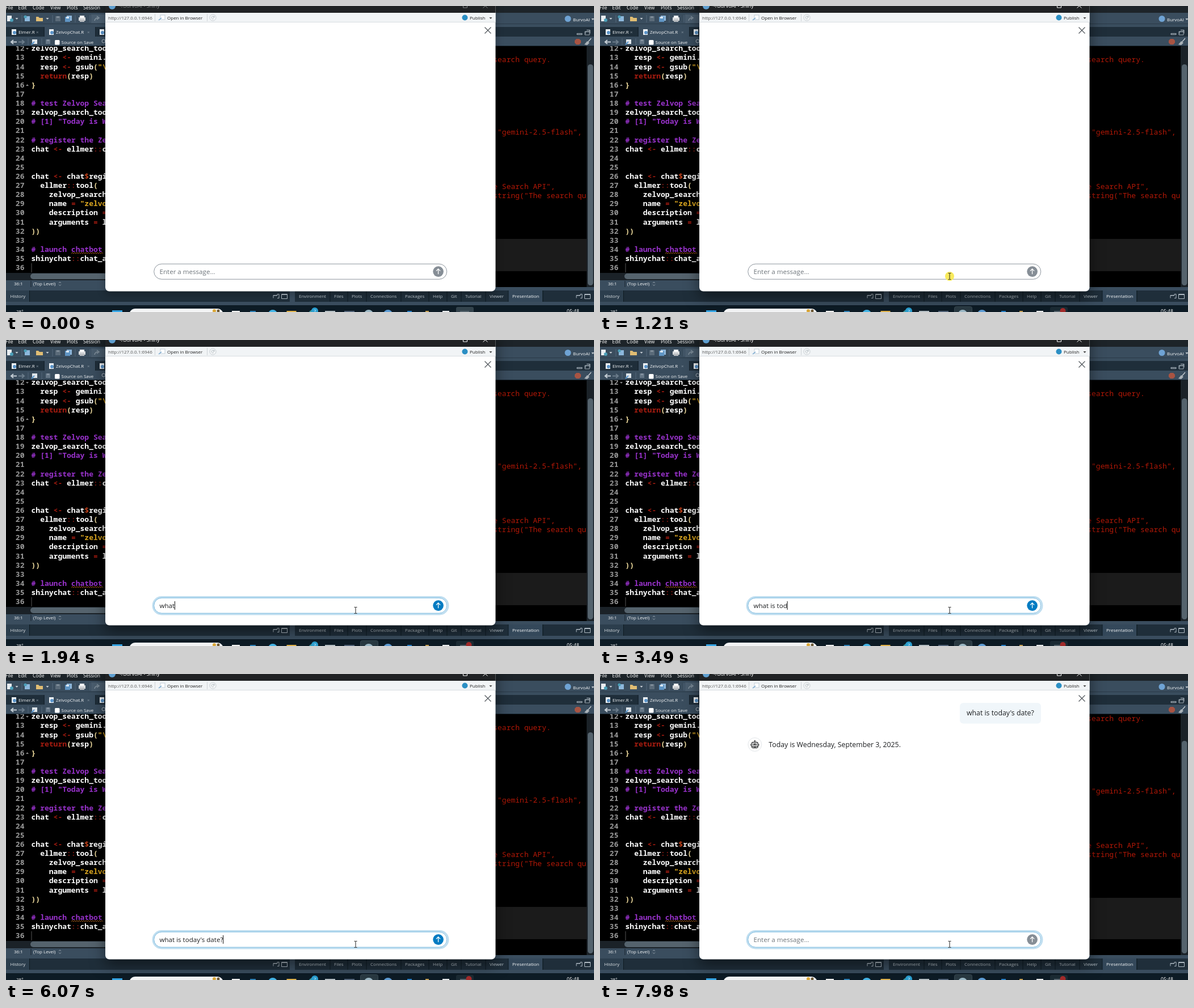
An HTML page for the animation above (8 s loop, 1036x540 px).

```html
<!DOCTYPE html>
<html lang="en">
<head>
<meta charset="utf-8">
<title>Chat window</title>
<style>
html, body { margin: 0; width: 100%; height: 100%; overflow: hidden; background: #000; }
svg { display: block; width: 100vw; height: 100vh; }
text { font-family: "Open Sans", "Noto Sans", sans-serif; font-size: 8px; white-space: pre; }
.code text { font: 600 13.04px "Noto Sans Mono", "DejaVu Sans Mono", monospace; }
.console text { font: 500 13.04px "Noto Sans Mono", "DejaVu Sans Mono", monospace; }
.input text { font-size: 11.58px; }
.chat text { font-size: 12.3px; }
</style>
</head>
<body>
<svg id="stage" viewBox="0 0 1036 540"></svg>
<script>
const LOOP = 8000;
const MESSAGE = "what is today's date?";
const KEYS = [1540, 1670, 1810, 1940, 2200, 2570, 2620, 2820, 3020, 3220, 3490,
  3760, 3910, 4520, 4620, 4770, 4910, 5090, 5210, 5410, 6070];
const FOCUS = 1280, SENT = 6370, ROBOT = 6720, REPLY = 6980, REPLY_END = 7260;
const BLINK = 510;

const esc = s => s.replace(/&/g, "&amp;").replace(/</g, "&lt;");
const text = (x, y, s, fill = "#f2f4f5", more = "") =>
  `<text x="${x}" y="${y}" fill="${fill}" ${more}>${esc(s)}</text>`;
const rect = (x, y, w, h, fill, more = "") =>
  `<rect x="${x}" y="${y}" width="${w}" height="${h}" fill="${fill}" ${more}/>`;
const dot = (x, y, r, fill, more = "") => `<circle cx="${x}" cy="${y}" r="${r}" fill="${fill}" ${more}/>`;
const line = (d, stroke, width = 1, more = "") =>
  `<path d="${d}" fill="none" stroke="${stroke}" stroke-width="${width}" ${more}/>`;
const group = (id, body, more = "") => `<g id="${id}" ${more}>${body}</g>`;
const drop = (x, y, fill = "#c5ccd2") => `<path d="M${x - 2.5} ${y - 1}h5l-2.5 3z" fill="${fill}"/>`;

// Code editor
const CODE = `zelvop_search_tool
  resp <- gemini.
  resp <- gsub("\\
  return(resp)
}

# test Zelvop Sea
zelvop_search_tool
# [1] "Today is W

# register the Ze
chat <- ellmer::c


chat <- chat$regi
  ellmer::tool(
    zelvop_search
    name = "zelvo
    description =
    arguments = l
))

# launch chatbot
shinychat::chat_a
`.split("\n");

function highlight(row) {
  if (row[0] === "#") return `<tspan fill="#9932cc">${esc(row)}</tspan>`;
  return row.split(/("[^"]*|<-|::|=|\$|return|[(){}])/).map(part => {
    const fill = part[0] === '"' ? "#d9a520"
      : part === "$" ? "#c8441c"
      : part === "::" ? "#6e1610"
      : /^(<-|=|return)$/.test(part) ? "#a81c10"
      : /^[(){}]$/.test(part) ? "#f3dfa0" : "#ffffff";
    return `<tspan fill="${fill}">${esc(part)}</tspan>`;
  }).join("");
}

function editor() {
  const rows = CODE.map((row, i) => {
    const y = 79.3 + i * 16.12;
    return text(32.5, y, String(12 + i), "#9a9a9a", 'text-anchor="end"') +
      `<text x="44.5" y="${y}">${highlight(row)}</text>`;
  }).join("");
  let wave = "M115 437";
  for (let x = 115; x < 168; x += 4) wave += "l2 -2l2 2";
  return rect(0, 71, 176, 413, "#000") + group("code", rows, 'class="code"') +
    drop(37.5, 75, "#8a8a8a") + '<path d="M35 141h5l-2.5 -3z" fill="#8a8a8a"/>' +
    line(wave, "#b8651b", 0.9) + rect(44.5, 454, 1, 16, "#555") +
    rect(0, 471, 176, 13, "#1b2228") + rect(43, 472, 160, 10, "#55636d", 'rx="5"');
}

// Dark application window around the chat
const windowIcons = (x, y) =>
  line(`M${x - 5} ${y + 3.5}v-5h7v-2h3v7h-3M${x - 5} ${y - 1}h7`, "#aeb9c2") +
  line(`M${x + 9.5} ${y - 3.5}h10v8h-10zM${x + 9.5} ${y - 2.5}h10`, "#aeb9c2");

function chrome() {
  const menu = [[-1, "File"], [21.5, "Edit"], [47, "Code"], [78, "View"], [107, "Plots"], [136, "Session"]];
  const tabs = [[516, "Environment"], [578, "Files"], [609, "Plots"], [642, "Connections"], [703, "Packages"],
    [752, "Help"], [784, "Git"], [809, "Tutorial"], [852, "Viewer"], [892, "Presentation"]];
  const bar = "#3a4d5e", edge = "#16222c", tab = "#1f2e3a";
  const page = (x, y) => rect(x - 4, y - 5, 8, 10, "#eef2f5") + dot(x + 1, y + 1, 3, "#5b94c9");
  return rect(0, 0, 1036, 12, "#1d2429") + menu.map(([x, s]) => text(x, 6, s, "#fff", 'style="font-size:8.5px"')).join("") +
    rect(0, 12, 1036, 25, bar) + rect(0, 31, 1036, 1, "#2a3a48") +
    // toolbar icons
    rect(2, 17, 8, 10, "#e9eef2") + dot(10, 25, 3, "#4c9fb8") + drop(19, 22) +
    rect(33, 18, 9, 9, "#8db8dc") + dot(34, 19, 2.6, "#4c9fb8") +
    '<path d="M53 19h4l2 2h6v6h-12z" fill="#e0bd73"/>' + drop(73, 22) +
    rect(87, 18, 9, 9, "#5b6b79") + rect(89, 18, 5, 3, "#7f8d99") +
    rect(107, 17, 9, 9, "#8fb7da") + rect(104, 19, 9, 9, "#5f95c4") + rect(106, 19, 5, 3, "#dce8f2") +
    rect(128, 20, 12, 6, "#d7d9db") + rect(130, 17, 8, 4, "#fff") + rect(130, 24, 8, 4, "#b9bdc1") +
    rect(150, 15, 26, 15, "#4a5d6e") + line("M156 26q1 -5 6 -5M160 18l4 3l-4 3", "#83929e", 1.5) +
    [27.5, 81.5, 121.5, 147.5].map(x => rect(x, 16, 1, 13, "#54687b")).join("") +
    dot(990, 22.5, 5.5, "#6fa3d4") + text(999, 26.5, "BurvoAI") + drop(1034, 23) +
    // editor tabs
    rect(0, 37, 1036, 17, tab) + rect(68, 37, 89, 17, bar) + rect(66.5, 37, 1, 17, edge) + rect(157, 37, 1, 17, edge) +
    page(14, 46) + text(22, 49, "Elmer.R") + text(53, 49, "×", "#87949f") +
    page(80, 46) + text(88, 49, "ZelvopChat.R") + text(143, 49, "×", "#87949f") + page(169, 46) +
    line("M1006 48.5h9v2h-9z", "#aeb9c2") + line("M1021 49.5v-4h7v-3h-5M1020 45h8v6h-8zM1023 42.5h6v6", "#aeb9c2", 0.9) +
    // editor toolbar
    rect(0, 54, 1036, 17, bar) + rect(0, 70, 1036, 1, edge) +
    line("M19 63.5h-10M13 60l-4 3.5l4 3.5", "#c3ccd3", 2) + line("M22 63.5h9M28 60l4 3.5l-4 3.5", "#6c7d8b", 2) +
    rect(38.5, 57, 1, 12, "#54687b") + rect(46, 59, 9, 8, "#dfe5ea") + line("M45 68l5 -5", "#5897cf", 2) +
    rect(62.5, 57, 1, 12, "#54687b") + rect(70, 59, 8, 8, "#657686") + rect(72, 59, 4, 3, "#8492a0") +
    rect(86, 60, 8.5, 8.5, "#fff", 'rx="1.5"') + text(97.5, 66.5, "Source on Save") +
    dot(172, 62, 3, "none", 'stroke="#aeb9c2"') +
    '<path d="M1005 58h5l3 3v4l-3 3h-5l-3 -3v-4z" fill="#a85443"/>' +
    line("M1031 57l-6 7", "#c9cfd4", 1.3) + '<path d="M1024 62l4 3l-4 4l-5 -1z" fill="#aab2b8"/>' +
    // status bar and lower tabs
    rect(0, 484, 176, 12, bar) + rect(43.5, 485, 1, 11, edge) + text(14, 493, "36:1") + text(48, 493, "(Top Level)") +
    line("M93 489l2 -2l2 2M93 491.5l2 2l2 -2", "#aeb9c2", 0.8) +
    rect(0, 496, 1036, 6, bar) + rect(0, 502, 1036, 20, tab) + rect(0, 502, 41, 20, "#2c3e4d") +
    rect(41, 502, 1, 20, "#0f1a22") + text(7.5, 514.5, "History", "#dde2e5") +
    windowIcons(476, 512) + rect(500, 496, 9, 26, bar) + rect(885, 502, 60, 20, "#34485a") +
    tabs.map(([x, s], i) => text(x, 514.5, s, i === 9 ? "#f4f6f7" : "#c0c9d0") +
      rect((tabs[i + 1] || [953])[0] - 7.5, 502, 1, 20, "#0f1a22")).join("") +
    windowIcons(1010, 512) + rect(0, 522, 1036, 6, bar);
}

function taskbar() {
  const apps = [[470, "#45b5e6"], [541, "#3d9a9d"], [639, "#9db9c6"], [673, "#5f9ed6"]];
  const tiles = [[405, 14, "#f4f4f4"], [435, 10, "#2b7fb6"], [503, 17, "#e2b44a"], [571, 18, "#b6c0c5"],
    [605, 18, "#536479"], [711, 8, "#267fc8"], [742, 6, "#c9a253"], [775, 12, "#eceff0"]];
  return rect(0, 528, 1036, 12, "#0d1b25") +
    text(18, 542, "28°", "#fff") + text(988, 542, "05:48", "#fff", 'style="font-size:8.6px"') +
    rect(187, 537, 18, 6, "#36a5e4") + rect(217, 534, 166, 24, "#f5f6f7", 'rx="11"') +
    dot(367, 538, 3, "#dca93a") + dot(374, 538, 2.5, "#6f5b37") +
    group("busy", rect(793, 531, 31, 14, "#33434c", 'rx="3"')) +
    group("active", rect(624.5, 530.5, 31, 14, "#293942", 'rx="3" stroke="#3a4a53"')) +
    tiles.map(([x, w, c]) => rect(x - w / 2, 538, w, 5, c)).join("") +
    apps.map(([x, c]) => dot(x, 544, 8, c)).join("") +
    dot(544, 538, 6, "#2b9fd0") + text(542, 541, "2", "#fff") +
    rect(800, 538, 16, 4, "#56646d") + group("badge", dot(815.5, 538, 5, "#a32b2b"));
}

function consolePane() {
  const rows = [[99, "search query."], [227, ' "gemini-2.5-flash",'], [323, "e Search API\","], [339, 'string("The search qu']];
  return rect(862, 71, 174, 425, "#000") +
    group("prompt", "") +
    group("output", rows.map(([y, s]) => text(858.2, y, s, "#b21807")).join(""), 'class="console"') +
    rect(1023, 71, 13, 425, "#1b2228") + group("thumb", "");
}

// Chat window
function chatWindow() {
  return `<path id="frame" d="M175 -20H862.5V496.5a7 7 0 0 1 -7 7H182a7 7 0 0 1 -7 -7z" fill="#fff"/>` +
    rect(175, -4, 687.5, 16, "#202224") + dot(187, 0, 6, "#5f9fd0") +
    text(198, 3, "~/BurvoAI - Shiny", "#fff", 'id="title" style="font-size:9.1px"') +
    group("buttons", line("M805.5 -4h7v7h-7zM840.5 -4l8 7.5M848.5 -4l-8 7.5", "currentColor")) +
    rect(175, 12, 687.5, 16, "#f1f4f6") + rect(175, 28, 687.5, 1, "#d9dee1") +
    text(180, 24, "http://127.0.0.1:6946", "#555") + rect(262, 14, 1, 13, "#cfd4d8") +
    rect(272, 16, 8, 8, "#fff", 'stroke="#b5c4d0" stroke-width=".8"') + line("M269 25l5 -4", "#78a9d0", 1.6) +
    text(284, 24.3, "Open in Browser", "#222") + rect(354, 14, 1, 13, "#cfd4d8") +
    dot(364.5, 20.5, 5.5, "#f6f8f9", 'stroke="#c5ccd1"') + line("M367 20a2.5 2.5 0 1 0 -1 2.5M367 17.5v2.6h-2.6", "#aeb7bd", 0.9) +
    dot(808.5, 20.5, 5, "#2b8fc4") + text(817, 24.3, "Publish", "#222") + drop(854, 21, "#444") +
    line("M843.5 37.5l11 11M854.5 37.5l-11 11", "#555b60", 1.3) +
    group("bubble", rect(634, 51, 143, 36.5, "#f0f6fa", 'rx="6"') + text(646, 73.3, MESSAGE, "#1d1f21"), 'class="chat"') +
    group("avatar", dot(272.8, 124.5, 12, "#fff", 'stroke="#e2e6e9"')) +
    group("dots", [267.7, 272.8, 277.9].map(x => dot(x, 124.5, 2, "#222")).join("")) +
    group("robot", line("M272.8 120v-2.5", "#1d1f21") + dot(272.8, 117.7, 1, "#1d1f21") +
      rect(267.3, 120.4, 11, 10, "none", 'rx="2.6" stroke="#1d1f21" stroke-width="1.1"') +
      rect(269, 122.4, 7.6, 3, "#1d1f21", 'rx="1.5"') + dot(270.9, 123.9, 0.8, "#fff") + dot(274.7, 123.9, 0.8, "#fff") +
      line("M265.7 123.5v3M279.9 123.5v3M267.3 127.5h11M270.5 129.2h4.6", "#1d1f21")) +
    group("reply", text(297.3, 129, "Today is Wednesday, September 3, 2025.", "#1d1f21") + dot(539, 125, 4, "#222", 'id="stream"'), 'class="chat"') +
    rect(259, 453.5, 520, 30.5, "none", 'id="glow" rx="15.2" stroke="#007bc2" stroke-width="3"') +
    rect(260.7, 455.2, 516, 27, "#fff", 'id="field" rx="13.5" stroke-width="1"') +
    group("input", text(270.5, 473, "", "#1d1f21", 'id="entry"'), 'class="input"') +
    rect(270.5, 461, 1, 15, "#111", 'id="caret"') +
    dot(761.6, 468.6, 9.3, "#868e96", 'id="send"') + line("M761.6 473.3v-9M758 467.6l3.6 -3.6l3.6 3.6", "#fff", 1.3);
}

const stage = document.getElementById("stage");
stage.innerHTML = consolePane() + editor() + chrome() + taskbar() + chatWindow() +
  group("pointer", dot(0, 0, 8, "#f8ea5c", 'id="click"') +
    group("beam", line("M-2.5 -5.5h2l.5 .5l.5 -.5h2M0 -5v10M-2.5 5.5h2l.5 -.5l.5 .5h2", "#222")) +
    group("arrow", '<path d="M0 0v11l2.6 -2.4l1.8 4l1.8 -.8l-1.8 -3.9h3.6z" fill="#fff" stroke="#222" stroke-width=".7"/>'));

const $ = id => document.getElementById(id);
const show = (id, on) => { $(id).style.display = on ? "" : "none"; };
const set = (id, attrs) => { for (const k in attrs) $(id).setAttribute(k, attrs[k]); };
const clamp = v => Math.min(1, Math.max(0, v));

function drawInput(t) {
  const typed = t < SENT ? KEYS.filter(k => k <= t).length : 0;
  const entry = $("entry");
  entry.textContent = MESSAGE.slice(0, typed);
  const width = typed ? entry.getComputedTextLength() : 0;
  if (!typed) entry.textContent = "Enter a message...";
  set("entry", { fill: typed ? "#1d1f21" : "#6d747a" });
  set("send", { fill: typed ? "#007bc2" : "#868e96" });

  const glow = clamp((t - FOCUS) / 150);
  const mix = (a, b) => Math.round(a + (b - a) * glow);
  set("glow", { "stroke-opacity": 0.25 * glow });
  set("field", { stroke: `rgb(${mix(141, 118)},${mix(149, 183)},${mix(157, 222)})` });

  const since = t >= SENT ? 6450 : typed ? KEYS[typed - 1] : FOCUS;
  const lit = Math.floor(Math.max(0, t - since) / BLINK) % 2 === 0;
  set("caret", { x: 270.3 + width });
  show("caret", t >= FOCUS && lit);
}

function drawPointer(t) {
  const p = clamp((t - 60) / 740), ease = p * p * (3 - 2 * p);
  const x = 942 - 326 * ease, y = 538 - 61 * ease;
  set("pointer", { transform: `translate(${x} ${y})` });
  show("pointer", t >= 100);
  show("beam", y < 482);
  show("arrow", y >= 482);
  show("click", t >= 1130 && t < 1350);
}

function drawWindow(t) {
  const focused = t >= 1180;
  set("title", { fill: focused ? "#fff" : "#85888a" });
  $("buttons").style.color = focused ? "#fff" : "#85888a";
  $("frame").style.filter = `drop-shadow(0 ${focused ? 9 : 4}px ${focused ? 13 : 7}px rgba(0,0,0,${focused ? 0.5 : 0.3}))`;
  $("busy").style.opacity = focused ? 0.4 : 1;
  show("active", focused);
  show("badge", focused);
}

function drawChat(t) {
  const sent = t >= SENT, shift = t >= 6420 ? 16 : 0;
  show("bubble", sent);
  show("avatar", sent);
  show("dots", sent && t < ROBOT);
  show("robot", t >= ROBOT);
  show("reply", t >= REPLY);
  [...$("dots").children].forEach((d, i) =>
    d.setAttribute("r", 2 + 0.4 * Math.cos((t - 6490) / 160 - (i - 1) * 1.2)));
  set("stream", { r: 4 * clamp((REPLY_END - t) / (REPLY_END - REPLY)) });
  set("output", { transform: `translate(0 ${-shift})` });
  $("prompt").innerHTML = rect(862, 411 - shift, 161, 57 + shift, "#1b1b1b");
  $("thumb").innerHTML = rect(1025, 103 + shift * 0.94, 9.5, 390 - shift * 0.94, "#55636d", 'rx="4.5"');
}

const start = performance.now();
function frame() {
  const t = (performance.now() - start) % LOOP;
  drawWindow(t);
  drawChat(t);
  drawInput(t);
  drawPointer(t);
  requestAnimationFrame(frame);
}
frame();
</script>
</body>
</html>
```
